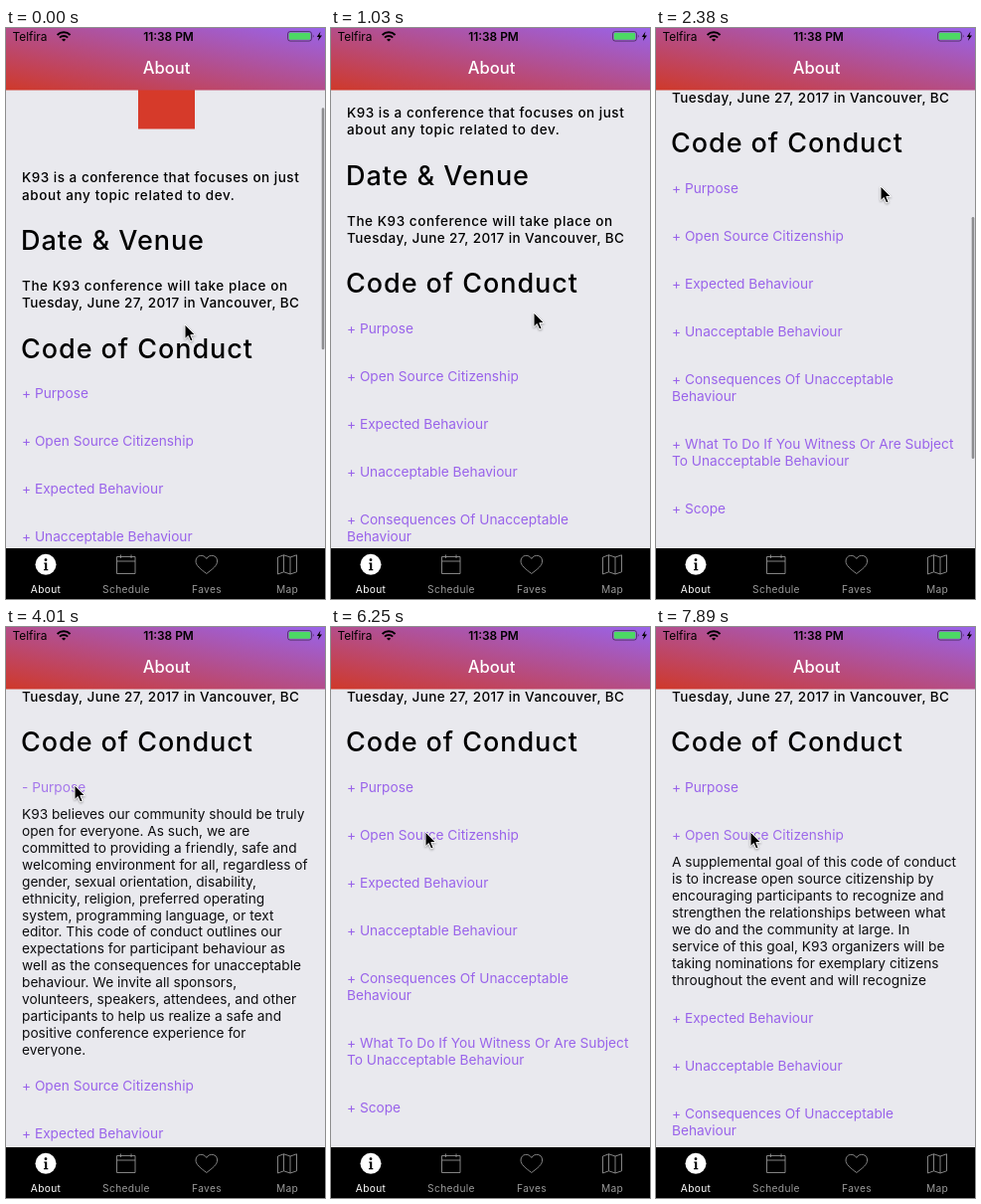
Animation of 321 by 574 pixels, one loop 8 s. Source, as an HTML page:

```html
<!DOCTYPE html>
<html lang="en">
<head>
<meta charset="utf-8">
<title>About</title>
<style>
  html, body { margin: 0; width: 100%; height: 100%; overflow: hidden; background: #e9e9ee; }
  svg { display: block; width: 321px; height: 574px; }
  text { font-family: Inter, "Open Sans", sans-serif; font-optical-sizing: none; white-space: pre; }
  .heading { font-size: 27px; font-weight: 500; letter-spacing: .95px; }
  .lead { font-size: 13.5px; font-weight: 500; }
  .link, .panel { font-size: 13.7px; }
  .link { fill: #9963ea; }
  .panel { fill: #0c0c0e; }
  .status { font-size: 11.9px; }
  .tab { font-size: 10.2px; letter-spacing: .35px; text-anchor: middle; fill: #999; }
  .icon { fill: none; stroke: #929292; stroke-width: .9; stroke-linejoin: round; }
</style>
</head>
<body>
<svg viewBox="0 0 321 574">
  <defs>
    <linearGradient id="sunset" x1="0" y1="1" x2="1" y2="0">
      <stop offset="0" stop-color="#cf392a"/>
      <stop offset="1" stop-color="#9963ea"/>
    </linearGradient>
    <clipPath id="purposeClip"><rect x="0" y="179.5" width="321" height="0"/></clipPath>
    <clipPath id="citizenClip"><rect x="0" y="227.5" width="321" height="0"/></clipPath>
  </defs>
  <rect width="321" height="574" fill="#e9e9ee"/>

  <g id="page">
    <rect x="133" y="-162" width="57" height="57" fill="#d63a2a"/>
    <text class="lead" x="16" y="-51.3" letter-spacing=".5">K93 is a conference that focuses on just</text>
    <text class="lead" x="16" y="-33.9" letter-spacing=".63">about any topic related to dev.</text>
    <text class="heading" x="15" y="16.8">Date &amp; Venue</text>
    <text class="lead" x="16" y="57.6" letter-spacing=".57">The K93 conference will take place on</text>
    <text class="lead" x="16" y="74.8" letter-spacing=".42">Tuesday, June 27, 2017 in Vancouver, BC</text>
    <text class="heading" x="15" y="125.3">Code of Conduct</text>

    <text class="link" id="purposeLink" x="16" y="165.9">+ Purpose</text>
    <g id="purposePanel" clip-path="url(#purposeClip)"></g>
    <g id="afterPurpose">
      <text class="link" id="citizenLink" x="16" y="213.9">+ Open Source Citizenship</text>
      <g id="citizenPanel" clip-path="url(#citizenClip)"></g>
      <g id="afterCitizen">
        <text class="link" x="16" y="261.9">+ Expected Behaviour</text>
        <text class="link" x="16" y="309.9">+ Unacceptable Behaviour</text>
        <text class="link" x="16" y="357.9">+ Consequences Of Unacceptable</text>
        <text class="link" x="16" y="374.9">Behaviour</text>
        <text class="link" x="16" y="422.9">+ What To Do If You Witness Or Are Subject</text>
        <text class="link" x="16" y="439.9">To Unacceptable Behaviour</text>
        <text class="link" x="16" y="487.8">+ Scope</text>
      </g>
    </g>
  </g>
  <rect id="scrollbar" x="317.7" y="190" width="2.6" height="243" rx="1.3" fill="#000" fill-opacity=".4"/>

  <rect width="321" height="62.5" fill="url(#sunset)"/>
  <text class="status" x="6.5" y="12.8">Telfira</text>
  <g fill="none" stroke="#000" stroke-width="1.9">
    <path d="M51.6 7a9.2 9.2 0 0 1 13 0M54 9.7a5.8 5.8 0 0 1 8.200 0"/>
    <path d="M56 11.700a3 3 0 0 1 4.200 0L58.100 13.600Z" fill="#000" stroke="none"/>
  </g>
  <text class="status" x="163.5" y="12.8" text-anchor="middle" font-weight="600">11:38 PM</text>
  <rect x="283.5" y="3.5" width="24" height="9.600" rx="2.500" fill="none" stroke="#000" stroke-opacity=".5" stroke-width=".9"/>
  <rect x="284.800" y="4.800" width="21.400" height="7" rx="1.400" fill="#4cd964"/>
  <path d="M308.900 6.500q1.500 1.800 0 3.600Z" fill-opacity=".6"/>
  <path d="M316.500 3.500L312.800 9H315L313.900 13L318 7.500H315.500Z"/>
  <text x="161.500" y="46" font-size="16.600" font-weight="500" fill="#fff" text-anchor="middle">About</text>

  <rect y="523" width="321" height="51"/>
  <circle cx="40" cy="539.300" r="10.500" fill="#fff"/>
  <path d="M38.300 537.500H41.200V544H42.300V545.200H38V544H39.200V538.700H38.300Z"/>
  <circle cx="40" cy="534.700" r="1.400"/>
  <g class="icon">
    <path d="M111.500 531.500H130V548.500H111.500ZM111.500 536H130M115.500 529.500V533M126 529.500V533"/>
    <path d="M201.800 548.500C196 544 191 540.500 191 536C191 529.500 199 528.500 201.800 533.500C204.600 528.500 212.600 529.500 212.600 536C212.600 540.500 207.600 544 201.800 548.500Z"/>
    <path d="M273.500 532L279.500 529.800L286 532L292.500 529.800V546.800L286 549L279.500 546.800L273.500 549ZM279.500 529.800V546.800M286 532V549"/>
  </g>
  <text class="tab" x="40" y="568" style="fill:#fff">About</text>
  <text class="tab" x="121" y="568">Schedule</text>
  <text class="tab" x="202" y="568">Faves</text>
  <text class="tab" x="283" y="568">Map</text>

  <path id="cursor" d="M0 0V14.600L3.300 11.500L5.700 17L8.100 16L5.800 10.600H10.400Z" stroke="#fff" stroke-width="1" style="filter:drop-shadow(0 1px 1px rgba(0,0,0,.35))"/>
</svg>
<script>
const LOOP = 8000, TICK = 148.8, LEAD = 12;
const $ = id => document.getElementById(id);

function fillPanel(id, firstBaseline, lines) {
  lines.forEach((line, i) => {
    const text = document.createElementNS("http://www.w3.org/2000/svg", "text");
    text.setAttribute("class", "panel");
    text.setAttribute("x", 16);
    text.setAttribute("y", firstBaseline + i * 16.92);
    text.textContent = line;
    $(id).append(text);
  });
}

fillPanel("purposePanel", 193, [
  "K93 believes our community should be truly",
  "open for everyone. As such, we are",
  "committed to providing a friendly, safe and",
  "welcoming environment for all, regardless of",
  "gender, sexual orientation, disability,",
  "ethnicity, religion, preferred operating",
  "system, programming language, or text",
  "editor. This code of conduct outlines our",
  "expectations for participant behaviour as",
  "well as the consequences for unacceptable",
  "behaviour. We invite all sponsors,",
  "volunteers, speakers, attendees, and other",
  "participants to help us realize a safe and",
  "positive conference experience for",
  "everyone."
]);
fillPanel("citizenPanel", 241.4, [
  "A supplemental goal of this code of conduct",
  "is to increase open source citizenship by",
  "encouraging participants to recognize and",
  "strengthen the relationships between what",
  "we do and the community at large. In",
  "service of this goal, K93 organizers will be",
  "taking nominations for exemplary citizens",
  "throughout the event and will recognize",
  "select participants after the conference on",
  "the website."
]);

// Each track lists [tick, value] pairs; values between them are linear.
const tracks = {
  scroll: [[0, 206.5], [1, 184], [2, 162], [3, 148], [4, 142], [5, 141], [8, 141], [9, 128], [10, 107],
    [12, 64], [13, 36], [14, 16], [15, 5], [16, 0]],
  bar: [[0, 1], [5, 1], [7, 0], [8, 0], [9, 1], [17, 1], [19, 0]],
  cursorX: [[0, 180], [7, 204], [12, 216], [16, 226], [17, 222], [19, 165], [21, 98], [23, 69], [38, 69], [42, 95]],
  cursorY: [[0, 298], [2, 252], [4, 248], [7, 286], [8, 287], [10, 253], [12, 215], [14, 170], [16, 159],
    [38, 159], [42, 206]],
  purpose: [[25, 0], [26, 165], [27, 252], [28, 254], [35, 254], [36, 140], [37, 6], [38, 0]],
  citizen: [[45, 0], [46, 110], [47, 166], [48, 169], [52, 169], [53, 136]],
  purposeInk: [[25, 1], [26, .5], [27, .85], [28, 1], [34, 1], [35, .5], [36, .65], [38, 1]],
  citizenInk: [[43, 1], [44, .5], [45, .5], [46, .65], [49, 1], [51, 1], [52, .5], [53, .95]]
};

function valueAt(track, tick) {
  const next = track.findIndex(key => key[0] > tick);
  if (next < 0) return track[track.length - 1][1];
  if (next === 0) return track[0][1];
  const [t0, v0] = track[next - 1], [t1, v1] = track[next];
  return v0 + (v1 - v0) * (tick - t0) / (t1 - t0);
}

const move = (id, x, y) => $(id).setAttribute("transform", `translate(${x} ${y})`);

function section(name, title, height, open, ink) {
  $(name + "Clip").firstElementChild.setAttribute("height", height);
  $(name + "Link").textContent = (open ? "- " : "+ ") + title;
  $(name + "Link").setAttribute("opacity", ink);
}

function draw(tick) {
  const at = name => valueAt(tracks[name], tick);
  const scroll = at("scroll"), purpose = at("purpose"), citizen = at("citizen");
  move("page", 0, scroll);
  move("scrollbar", 0, -scroll * .531);
  $("scrollbar").setAttribute("opacity", at("bar"));
  section("purpose", "Purpose", purpose, tick >= 26 && tick < 36, at("purposeInk"));
  section("citizen", "Open Source Citizenship", citizen, tick >= 46 && tick < 53, at("citizenInk"));
  move("afterPurpose", 0, purpose);
  move("afterCitizen", 0, citizen);
  move("cursor", at("cursorX"), at("cursorY"));
}

// The screen refreshes in coarse ticks, so motion is held between them.
const start = performance.now();
function frame() {
  const time = (performance.now() - start) % LOOP;
  draw(Math.min(53, Math.floor((time + LEAD) / TICK)));
  requestAnimationFrame(frame);
}
frame();
</script>
</body>
</html>
```
